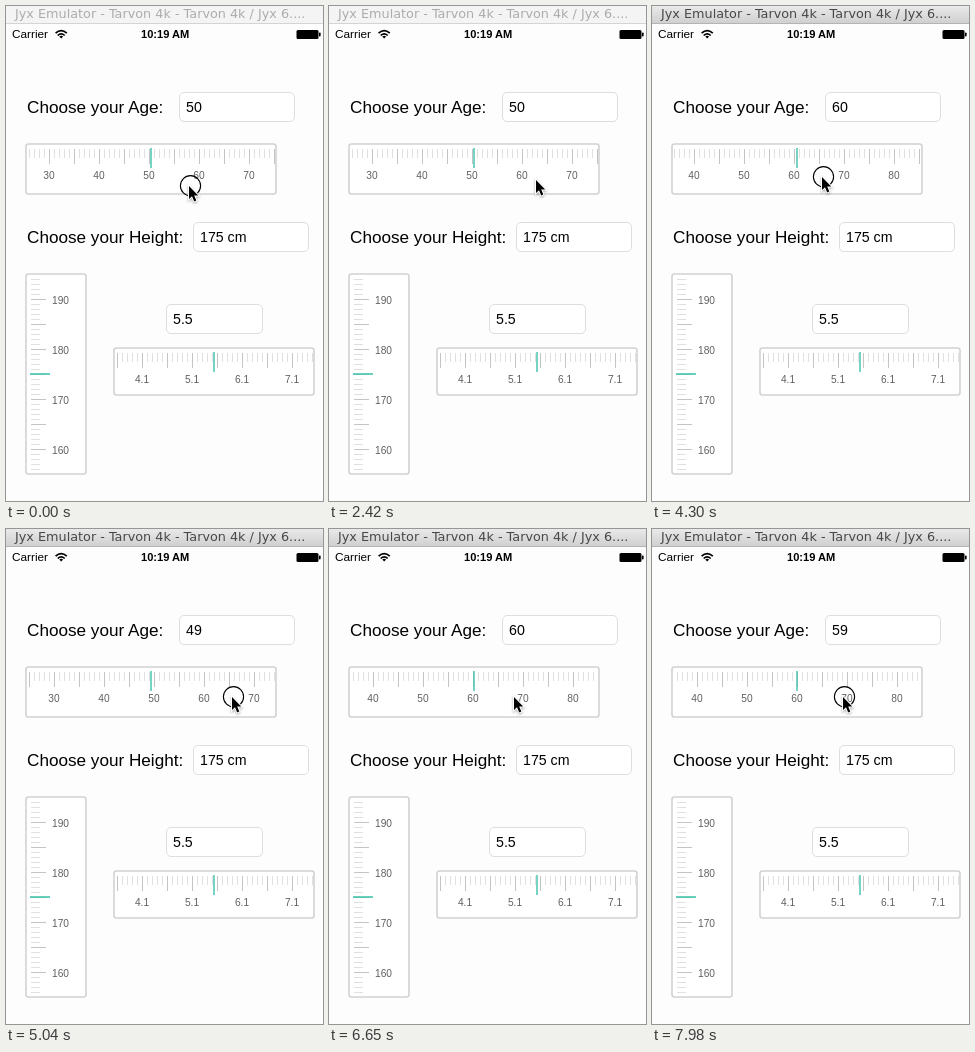
An HTML page that plays this animation: 317x495 px, repeating every 8000 ms.

```html
<!DOCTYPE html>
<html lang="en">
<head>
<meta charset="utf-8">
<title>Ruler pickers</title>
<style>
  html, body { margin: 0; width: 100%; height: 100%; overflow: hidden; background: #fdfdfd; }
  svg { display: block; }
  text { font-family: "Liberation Sans", Arial, sans-serif; }
  .title { font: 12.8px "DejaVu Sans", sans-serif; }
  .status { font-size: 11.8px; }
  .clock { font-size: 11.1px; font-weight: bold; }
  .prompt { font-size: 17.15px; }
  .field { font-size: 14.2px; }
  .mark { font-size: 10.2px; fill: #606060; }
  .box { fill: #fff; stroke: #dedede; }
  .frame { fill: #fff; stroke: #d2d2d2; stroke-width: 1.6; }
  .minor { stroke: #e0e0e0; }
  .major { stroke: #c4c4c4; }
  .needle { stroke: #43c4ae; stroke-width: 2; opacity: .72; }
  .needle.flat { stroke-width: 1.6; opacity: 1; }
</style>
</head>
<body>
<svg id="stage" width="317" height="495" viewBox="0 0 317 495">
  <defs>
    <linearGradient id="bar" x2="0" y2="1">
      <stop stop-color="#e9e9e9"/><stop offset="1" stop-color="#d0d0d0"/>
    </linearGradient>
  </defs>
  <rect width="317" height="495" fill="#fdfdfd"/>
  <rect id="titleBar" width="317" height="17"/>
  <path id="titleEdge" d="M0 17.5H317"/>
  <text id="title" class="title" x="9" y="12">Jyx Emulator - Tarvon 4k - Tarvon 4k / Jyx 6....</text>

  <text class="status" x="6" y="32">Carrier</text>
  <g fill="none" stroke="#000" stroke-width="1.7">
    <path d="M49.6 27.2Q55.2 22 60.8 27.2M51.7 29.5Q55.2 26.2 58.7 29.5"/>
    <path d="M53.3 30.4L55.2 32.4L57.1 30.4Q55.2 28.9 53.3 30.4Z" fill="#000" stroke="none"/>
  </g>
  <text class="clock" x="135" y="32">10:19 AM</text>
  <rect x="290.5" y="24" width="22" height="9" rx="1.5"/>
  <rect x="313" y="26.5" width="1.6" height="4" rx=".7"/>

  <text class="prompt" x="21" y="107">Choose your Age:</text>
  <rect class="box" x="173.5" y="86.5" width="115" height="29" rx="4.5"/>
  <text id="age" class="field" x="180" y="106"></text>

  <text class="prompt" x="21" y="237">Choose your Height:</text>
  <rect class="box" x="187.5" y="216.5" width="115" height="29" rx="4.5"/>
  <text class="field" x="194" y="236">175 cm</text>

  <rect class="box" x="160.5" y="298.5" width="96" height="29" rx="4.5"/>
  <text class="field" x="167" y="318">5.5</text>
</svg>
<script>
const $ = id => document.getElementById(id);
const stage = $('stage');

function add(parent, tag, attrs, text) {
  const node = document.createElementNS('http://www.w3.org/2000/svg', tag);
  for (const key in attrs) node.setAttribute(key, attrs[key]);
  if (text !== undefined) node.textContent = text;
  return parent.appendChild(node);
}

// A framed window; its content uses stage coordinates.
function frame(x, y, width, height) {
  add(stage, 'rect', { class: 'frame', x, y, width, height, rx: 2.5 });
  return add(stage, 'svg', { x: x + 1, y: y + 1, width: width - 2, height: height - 2,
    viewBox: `${x + 1} ${y + 1} ${width - 2} ${height - 2}` });
}

// Ticks stand 5px apart; each fifth is long, each tenth gets a label.
function ticks(parent, from, to, line, label) {
  let minor = '', major = '';
  for (let i = from; i <= to; i++) {
    if (i % 5) minor += line(i * 5, 9);
    else major += line(i * 5, 15);
    if (i % 10 === 0) label(i * 5, i);
  }
  add(parent, 'path', { class: 'minor', d: minor });
  add(parent, 'path', { class: 'major', d: major });
}

function horizontal(parent, from, to, top, format) {
  ticks(parent, from, to,
    (x, length) => `M${x + 0.5} ${top}v${length}`,
    (x, i) => add(parent, 'text', { class: 'mark', x, y: top + 30, 'text-anchor': 'middle' }, format(i)));
}

const ageFrame = frame(20, 138, 250, 50);
const ageScale = add(ageFrame, 'g', {});
horizontal(ageScale, -40, 50, 143, i => i + 50);
add(ageFrame, 'path', { class: 'needle', d: 'M145 142v20' });

const heightFrame = frame(20, 268, 60, 200);
const heightScale = add(heightFrame, 'g', { transform: 'translate(0 294)' });
ticks(heightScale, -5, 35,
  (y, length) => `M25 ${y - 0.5}h${length}`,
  (y, i) => add(heightScale, 'text', { class: 'mark', x: 46, y: y + 3.5 }, 190 - i));
add(heightFrame, 'path', { class: 'needle flat', d: 'M24 368h20' });

const weightFrame = frame(108, 342, 200, 47);
const weightScale = add(weightFrame, 'g', { transform: 'translate(136 0)' });
horizontal(weightScale, -6, 36, 347, i => (4.1 + i / 10).toFixed(1));
add(weightFrame, 'path', { class: 'needle', d: 'M208 346v20' });

const cursor = add(stage, 'g', {});
const ring = add(cursor, 'circle', { cx: 1.5, cy: -0.3, r: 10.1, fill: 'none', stroke: '#000', 'stroke-width': 1.1 });
add(cursor, 'path', { d: 'M0 0V13L3 10.3L5.2 15.4L7.3 14.5L5.2 9.5H9.2Z',
  stroke: '#fff', 'stroke-width': 2, 'paint-order': 'stroke',
  style: 'filter: drop-shadow(0 1px 1px #0005)' });

const LOOP = 8000, REST = 143;
const FRAME = 146.4, PHASE = 56;   // the screen refreshes at this slow beat
const ACTIVE = 3020;

// Pointer path: time, x, y.
const path = [[320, 183, 180], [920, 206, 175], [2420, 207, 174], [3160, 203, 174],
  [3570, 146, 174], [3720, 142, 173], [5040, 226, 168], [5630, 217, 168],
  [6060, 177, 168], [7240, 194, 168], [LOOP, 190.5, 168]];
const taps = [{ from: 0, to: 170 }, { from: ACTIVE, to: 3268 }];
// While dragged, the ruler keeps the distance "grab" behind the pointer.
const drags = [{ from: 3268, to: 3720, grab: 45 }, { from: 4160, to: 6060, grab: 78 },
  { from: 6940, to: LOOP, grab: 95.6 }];

const mix = (a, b, p) => a + (b - a) * p;
const within = t => span => t >= span.from && t < span.to;

function pointer(t) {
  const next = path.findIndex(key => key[0] > t);
  const b = path[next], a = path[next - 1] || b;
  const part = a === b ? 0 : (t - a[0]) / (b[0] - a[0]);
  return { x: mix(a[1], b[1], part), y: mix(a[2], b[2], part) };
}

// Follows the pointer during a drag, then glides to where the next drag picks it up.
function rulerOffset(t) {
  const held = (drag, time) => pointer(time).x - drag.grab;
  const drag = drags.find(within(t));
  if (drag) return held(drag, t);
  const next = drags.findIndex(d => d.from > t);
  if (next === 0) return REST;
  const last = drags[next - 1], coming = drags[next];
  const part = (t - last.to) / (coming.from - last.to);
  return mix(held(last, last.to), held(coming, coming.from), 1 - (1 - part) ** 3);
}

function draw(time) {
  const t = Math.max(0, PHASE + Math.floor((time - PHASE) / FRAME) * FRAME);
  const { x, y } = pointer(t);
  const offset = Math.round(rulerOffset(t));
  const active = time >= ACTIVE;
  const pressed = [...taps, ...drags].some(within(time));
  cursor.setAttribute('transform', `translate(${Math.round(x)} ${Math.round(y)})`);
  ring.setAttribute('visibility', pressed ? 'visible' : 'hidden');
  ageScale.setAttribute('transform', `translate(${offset} 0)`);
  $('age').textContent = Math.floor(50 + (144.9 - offset) / 5);
  $('titleBar').setAttribute('fill', active ? 'url(#bar)' : '#f4f4f4');
  $('titleEdge').setAttribute('stroke', active ? '#b4b4b4' : '#d4d4d4');
  $('title').setAttribute('fill', active ? '#484848' : '#acacac');
}

const start = performance.now();
function tick() {
  draw((performance.now() - start) % LOOP);
  requestAnimationFrame(tick);
}
tick();
</script>
</body>
</html>
```
